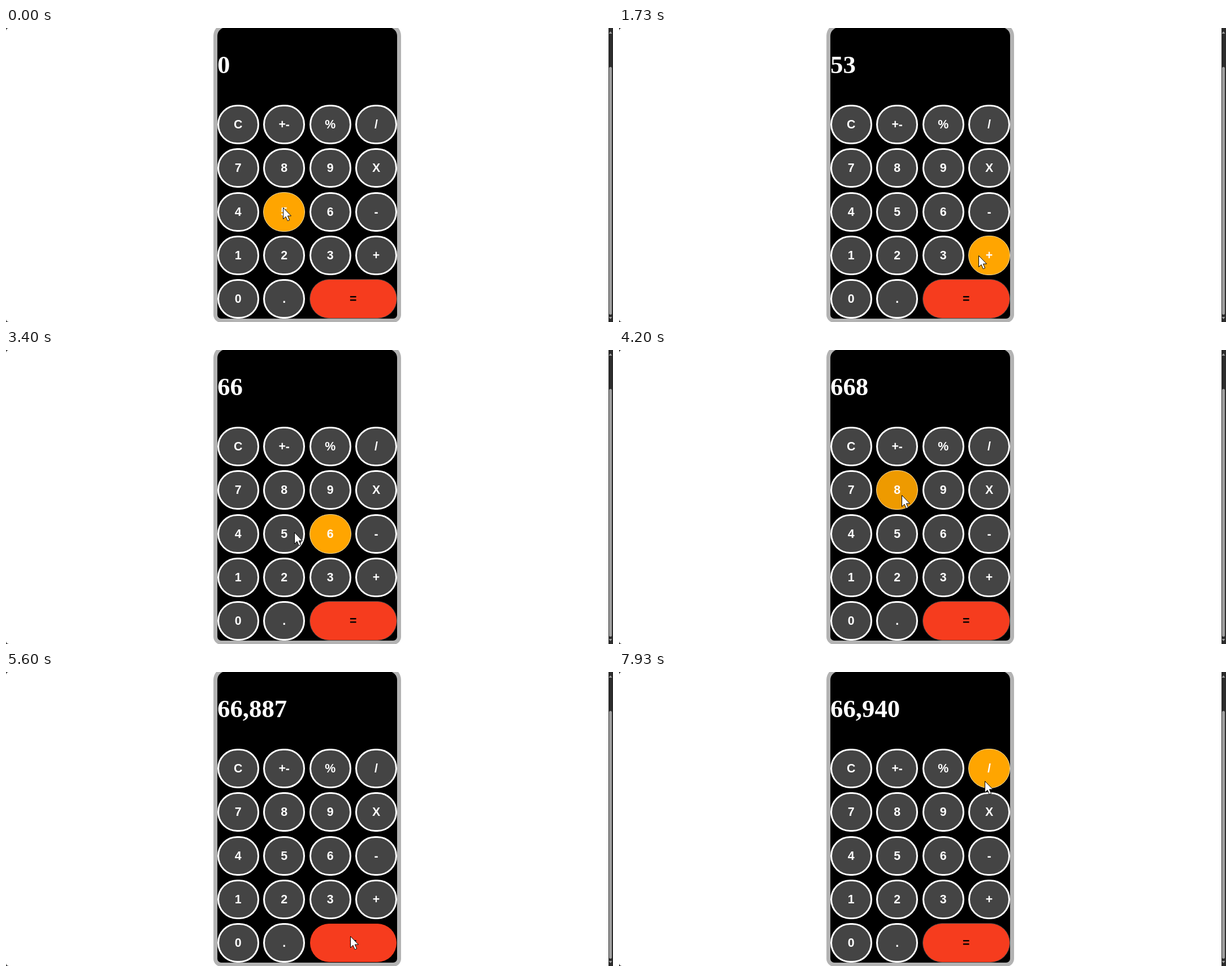
An HTML page that plays this animation: 1074 by 521 pixels, repeating every 8 s.

```html
<!DOCTYPE html>
<html lang="en">
<head>
<meta charset="utf-8">
<title>Calculator</title>
<style>
  html, body { margin: 0; width: 100%; height: 100%; overflow: hidden; background: #2c2c2c; }
  div, svg { position: absolute; box-sizing: border-box; }
  #page { left: 0; top: 0; width: 1065.5px; height: 521px; background: #fff; border-radius: 5px 0 0 5px; }
  #case {
    left: 367px; top: -8px; width: 332px; height: 530px;
    background: #000; border: 7px solid #b3b3b3; border-radius: 22px 22px 14px 14px;
  }
  #display {
    left: 374px; top: 39px; color: #fff; white-space: pre;
    font: bold 44.8px/52px "Liberation Serif", serif;
  }
  .key {
    width: 74px; height: 70px; border: 3px solid #fff; border-radius: 36px;
    background: #444; color: #fff; text-align: center;
    font: bold 21.3px/64px "Liberation Sans", sans-serif;
  }
  .key.hover { background: #ffa500; border: 1px solid #ffe0a0; line-height: 68px; }
  .key.hover.pressed { background: #ee9a00; }
  .key.equals {
    width: 155px; background: #f63c1e; color: #000;
    border: 1px solid #444; line-height: 68px;
  }
  .key.equals.pressed { border-color: #000; }
  #thumb { left: 1067px; top: 69px; width: 5px; height: 439px; border-radius: 3px; background: #9f9f9f; }
  #arrows { left: 1065px; top: 0; }
  #cursor { left: 0; top: 0; overflow: visible; }
</style>
</head>
<body>
<div id="page"></div>
<div id="case"></div>
<div id="display"></div>
<div id="keys"></div>
<div id="thumb"></div>
<svg id="arrows" width="9" height="521" fill="#9f9f9f">
  <path d="M1.5 10 4.5 6 7.5 10zM1.5 512 4.5 516 7.5 512z"/>
</svg>
<svg id="cursor" width="16" height="26">
  <path d="M.5 .5V20.5L5 16.3 8.3 23.8 11.6 22.3 8.4 15H14.5z" fill="#fff" stroke="#000"/>
</svg>
<script>
const LOOP = 8, STEP = 1 / 15, PRESS = 0.13;
const display = document.getElementById('display');
const cursor = document.getElementById('cursor');

const keys = {};
['C', '+-', '%', '/', '7', '8', '9', 'X', '4', '5', '6', '-',
 '1', '2', '3', '+', '0', '.', '='].forEach((label, i) => {
  const x = 373.8 + i % 4 * 81.4, y = 136.2 + Math.floor(i / 4) * 77.25;
  const el = document.createElement('div');
  el.className = label === '=' ? 'key equals' : 'key';
  el.textContent = label;
  el.style.left = x + 'px';
  el.style.top = y + 'px';
  document.getElementById('keys').append(el);
  keys[label] = { el, x: x + 37, y: y + 35 };
});

// A pointer stop near a key's centre, with its time span and click times in seconds
const stop = (label, dx, dy, arrive, leave, ...clicks) =>
  ({ label, x: keys[label].x + dx, y: keys[label].y + dy, arrive, leave, clicks });

const stops = [
  stop('5', -2, -8, 0, 0.47, 0.27),
  stop('3', 18, 0, 0.8, 1.53, 1),
  stop('+', -6, 0, 1.8, 2.07, 1.87),
  stop('6', 18, 32, 2.27, 2.27),
  stop('6', 15, 12, 2.47, 3.27, 2.53, 3),
  stop('5', 18, -1, 3.4, 3.4),
  stop('8', 8, 9, 3.67, 4.4, 3.87, 4.2),
  stop('7', 20, 9, 4.67, 4.87, 4.67),
  stop('=', 35, -12, 5.4, 6.27, 5.6),
  stop('-', -8, -14, 6.6, 6.6),
  stop('X', -6, 16, 6.8, 7.2),
  stop('/', -8, 22, 7.93, LOOP)
];
const clicks = stops.flatMap(({ label, clicks }) => clicks.map(time => ({ label, time })));

function pointerAt(t) {
  const next = stops.findIndex(s => s.leave >= t);
  const to = stops[next], from = stops[Math.max(0, next - 1)];
  if (t >= to.arrive) return to;
  const k = (t - from.leave) / (to.arrive - from.leave);
  return { x: from.x + (to.x - from.x) * k, y: from.y + (to.y - from.y) * k };
}

function resultAt(t) {
  let entry = 0, sum = 0;
  for (const { label, time } of clicks) {
    if (t < time + PRESS) break;
    if (label === '+') [sum, entry] = [entry, 0];
    else if (label === '=') entry += sum;
    else entry = entry * 10 + Number(label);
  }
  return entry.toLocaleString('en-US');
}

function render(seconds) {
  const t = Math.floor(seconds / STEP + 0.1) * STEP % LOOP + 0.005;
  const { x, y } = pointerAt(t);
  cursor.style.transform = `translate(${Math.round(x)}px, ${Math.round(y)}px)`;
  display.textContent = resultAt(t);

  // Highlighting trails the pointer by one step
  const lagged = pointerAt(Math.max(0, t - STEP));
  const pressed = clicks.find(({ time }) => t >= time && t < time + PRESS);
  for (const [label, key] of Object.entries(keys)) {
    const inside = Math.hypot((lagged.x - key.x) / 37, (lagged.y - key.y) / 35) < 1;
    key.el.classList.toggle('hover', label !== '=' && inside);
    key.el.classList.toggle('pressed', pressed?.label === label);
  }
}

const start = performance.now();
function loop() {
  render((performance.now() - start) / 1000 % LOOP);
  requestAnimationFrame(loop);
}
loop();
</script>
</body>
</html>
```
